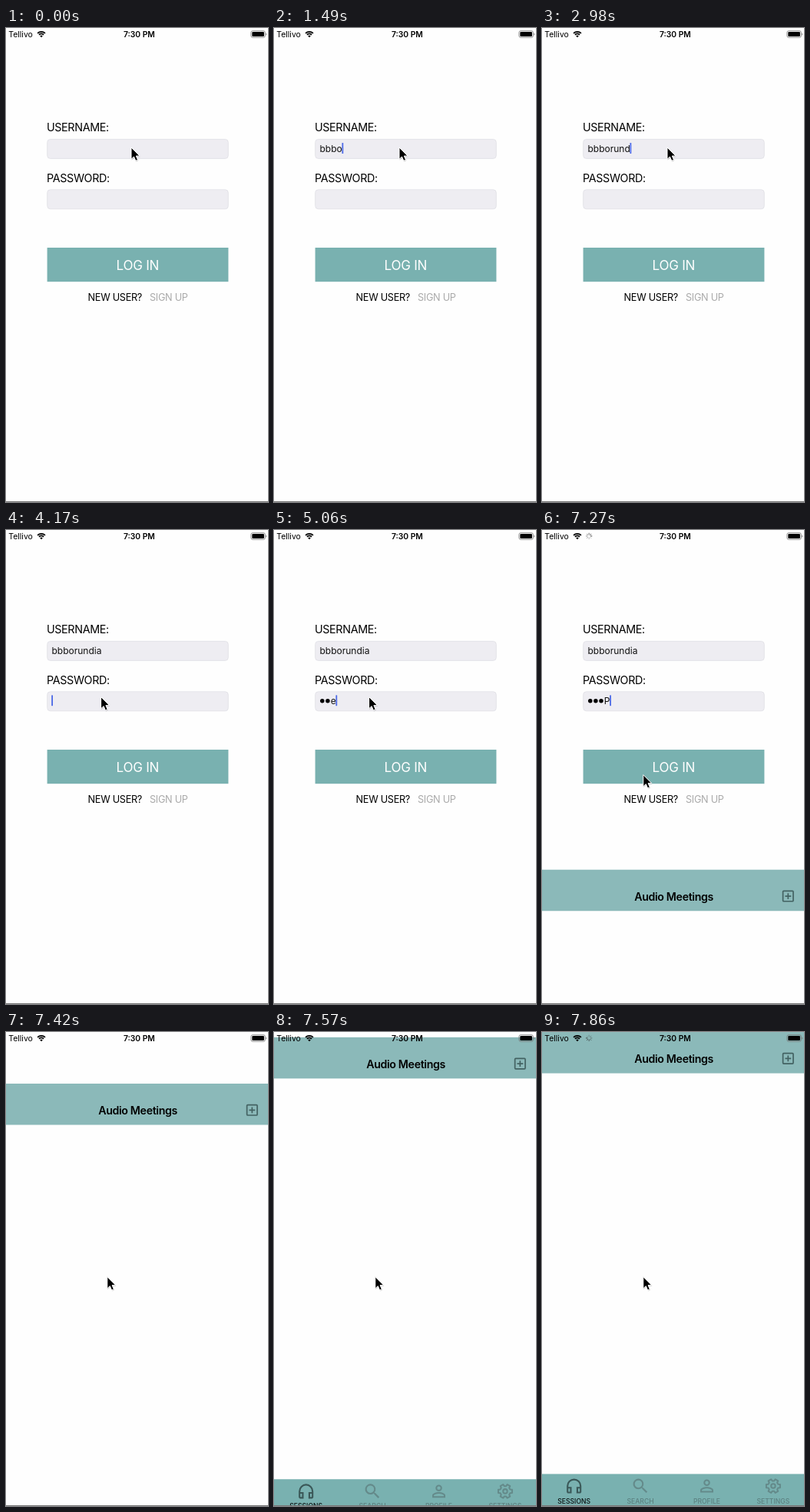
An HTML page for the animation above (8000 ms loop, 341 px wide and 615 px high).

```html
<!DOCTYPE html>
<html lang="en">
<head>
<meta charset="utf-8">
<title>Login screen</title>
<style>
  html, body { margin: 0; width: 100%; height: 100%; overflow: hidden; background: #fefefe; }
  svg { display: block; width: 100vw; height: 100vh; }
  text { font-family: Inter, Roboto, "Liberation Sans", sans-serif; white-space: pre; }
  .label { font-size: 14.3px; letter-spacing: -.35px; }
  .field { fill: #eeedf2; stroke: #dddde3; stroke-width: .7; }
  .entry { font-size: 12px; fill: #111; }
  .small { font-size: 12.7px; letter-spacing: -.3px; }
  .mid { text-anchor: middle; }
  .tab { font-size: 8.6px; font-weight: 500; fill: #5c8181; }
  .icon { fill: #648a8a; fill-rule: evenodd; }
  .active .tab { fill: #0c1414; }
  .active .icon { fill: #3b5858; }
</style>
</head>
<body>
<svg viewBox="0 0 341 615" preserveAspectRatio="none">
  <rect width="341" height="615" fill="#fefefe"/>

  <g id="login">
    <text class="label" x="53" y="134.3">USERNAME:</text>
    <rect class="field" x="53.7" y="144.4" width="235.6" height="25" rx="4"/>
    <text class="entry" id="user" x="59.5" y="160.6"></text>

    <text class="label" x="53" y="199.8">PASSWORD:</text>
    <rect class="field" x="53.7" y="209.8" width="235.6" height="25" rx="4"/>
    <g id="dots"></g>
    <text class="entry" id="letter" y="226.2"></text>
    <rect id="caret" width="1.8" height="14" rx=".6" fill="#4a68e6"/>

    <rect x="53.6" y="285" width="235.8" height="44.2" fill="#79b1b0"/>
    <text class="mid" id="press" x="171.3" y="313.9" font-size="17" letter-spacing="-.25" fill="#fff">LOG IN</text>
    <text class="small" x="106.6" y="354">NEW USER?</text>
    <text class="small" x="187" y="354" fill="#aaa">SIGN UP</text>
  </g>

  <g id="sheet">
    <rect width="341" height="615" fill="#fefefe"/>
    <rect width="341" height="53.5" fill="#8bb9b9"/>
    <text class="mid" x="171.6" y="40" font-size="14.2" font-weight="600" letter-spacing="-.35">Audio Meetings</text>
    <g fill="none" stroke="#436262" stroke-width="1.7">
      <rect x="313.6" y="27.6" width="13.4" height="13.4" rx="1"/>
      <path d="M320.3 30.4v7.8M316.4 34.3h7.8"/>
    </g>
    <rect y="573.4" width="341" height="42" fill="#79b1b0"/>
    <g id="tabs"></g>
  </g>

  <g id="status">
    <text x="3.2" y="12" font-size="10.5">Tellivo</text>
    <g fill="none" stroke="#000" stroke-width="1.8">
      <path d="M41.05 6.85a7 7 0 0 1 9.9 0"/>
      <path d="M42.96 8.76a4.3 4.3 0 0 1 6.08 0"/>
    </g>
    <path d="M46 12.2l-1.8-1.9a2.6 2.6 0 0 1 3.6 0z"/>
    <g id="spinner" stroke="#333" stroke-width=".9" stroke-linecap="round"></g>
    <text class="mid" x="173.4" y="12" font-size="10.3" font-weight="600">7:30 PM</text>
    <rect x="318.9" y="3.7" width="18.4" height="8.6" rx="2.2" fill="none" stroke="#777" stroke-width=".8"/>
    <rect x="320.3" y="5" width="15.6" height="6" rx="1.1"/>
    <path d="M338.4 6.4a1.8 1.8 0 0 1 0 3.2z" fill="#777"/>
  </g>

  <rect y="614" width="341" height="1" fill="#777"/>
  <g id="pointer">
    <path d="M0 0V15.4L3.5 12.2 5.8 17.5 8.7 16.3 6.4 11.2H11.2Z" transform="translate(.5 1)" fill="#000" opacity=".2"/>
    <path d="M0 0V15.2L3.5 12 5.8 17.3 8.5 16.1 6.3 11H11Z" fill="#000" stroke="#fff" stroke-width="1" stroke-linejoin="round"/>
  </g>
</svg>

<script>
const LOOP = 8000;
const NAME = 'bbborundia';
const DOT_STEP = 7.1;
const $ = id => document.getElementById(id);
const set = (el, attrs) => { for (const k in attrs) el.setAttribute(k, attrs[k]); };
function add(parent, tag, attrs, text = '') {
  const el = document.createElementNS('http://www.w3.org/2000/svg', tag);
  set(el, attrs);
  el.textContent = text;
  parent.append(el);
  return el;
}

// Gear outline with six teeth around (12, 12)
function gearPath() {
  const points = [];
  for (let tooth = 0; tooth < 6; tooth++) {
    for (const [turn, r] of [[-20, 6.4], [-13, 8.7], [13, 8.7], [20, 6.4]]) {
      const a = (tooth * 60 + 30 + turn) * Math.PI / 180;
      points.push((12 + r * Math.sin(a)).toFixed(2) + ' ' + (12 - r * Math.cos(a)).toFixed(2));
    }
  }
  return 'M' + points.join('L') + 'Z';
}

const icons = {
  SESSIONS: 'M12 3a9 9 0 0 0-9 9v7c0 1.1.9 2 2 2h4v-8H5v-1a7 7 0 0 1 14 0v1h-4v8h4c1.1 0 2-.9 2-2v-7a9 9 0 0 0-9-9zM7 15v4H5v-4zM19 19h-2v-4h2z',
  SEARCH: 'M15.5 14h-.8l-.3-.3A6.5 6.5 0 1 0 9.5 16c1.6 0 3.1-.6 4.2-1.6l.3.3v.8l5 5 1.5-1.5zM9.5 14a4.5 4.5 0 1 1 0-9 4.5 4.5 0 0 1 0 9z',
  PROFILE: 'M12 4a4 4 0 1 0 0 8 4 4 0 0 0 0-8zM12 5.9a2.1 2.1 0 1 1 0 4.2 2.1 2.1 0 0 1 0-4.2zM12 13c-2.7 0-8 1.3-8 4v3h16v-3c0-2.7-5.3-4-8-4zM12 14.9c3 0 6.1 1.5 6.1 2.1v1.1H5.9V17c0-.6 3.1-2.1 6.1-2.1z',
  SETTINGS: ''
};
Object.entries(icons).forEach(([name, path], i) => {
  const x = 41.7 + 86.4 * i;
  const tab = add($('tabs'), 'g', { class: i ? '' : 'active' });
  const icon = add(tab, 'g', { class: 'icon', transform: `translate(${x - 12.7} 576.3) scale(1.06)` });
  if (path) {
    add(icon, 'path', { d: path });
  } else {
    const line = { style: 'fill:none', stroke: '#648a8a', 'stroke-width': 1.9, 'stroke-linejoin': 'round' };
    add(icon, 'path', { d: gearPath(), ...line });
    add(icon, 'circle', { cx: 12, cy: 12, r: 2.6, ...line });
  }
  add(tab, 'text', { class: 'tab mid', x, y: 611.6 }, name);
});

const dots = [0, 1, 2].map(i =>
  add($('dots'), 'circle', { cx: 62.8 + DOT_STEP * i, cy: 221.8, r: 2.75 }));
const ticks = Array.from({ length: 8 }, (_, i) =>
  add($('spinner'), 'path', { d: 'M0-2.1V-3.7', transform: `translate(61.2 7.9) rotate(${i * 45})` }));

// Each track is a list of [start time, ...values]; values hold until the next start
const tracks = {
  typed: [[0, 0], [1490, 4], [2090, 5], [2530, 6], [2680, 7], [2980, 8], [3130, 9], [3280, 10]],
  secret: [[0, 0, ''], [4620, 0, 's'], [4770, 1, 'a'], [4910, 2, ''], [5060, 2, 'e'], [5660, 3, 'P']],
  caret: [[0, 'user', 0], [590, 'user', 1], [4020, 'user', 0], [4170, 'pass', 1],
    [6250, 'pass', .25], [6400, 'pass', 0], [6690, 'pass', 1]],
  pointer: [[0, 163, 155], [3430, 161, 158], [3570, 150, 173], [3720, 135, 197], [3870, 126, 212],
    [4020, 123.6, 216.6], [5960, 124, 262], [6100, 128, 335], [6250, 129.6, 331.5],
    [6400, 130.3, 324], [6540, 131.6, 318], [6690, 131.8, 317.6]],
  press: [[0, 1], [6840, .3], [7130, 1]],
  spinner: [[0, 0], [6980, 1], [7420, 0], [7710, 1]],
  slide: [[0], [7130], [7270], [7420], [7570], [7710], [7860]]
};
const keyAt = (track, t) => track.findLast(key => key[0] <= t);
const at = (name, t) => keyAt(tracks[name], t).slice(1);

// Critically damped spring, from the bottom edge to the top
function sheetTop(t) {
  const x = Math.max(0, t - 7212.2) * .0182;
  return 615 * (1 + x) * Math.exp(-x);
}

function draw(t) {
  $('user').textContent = NAME.slice(0, at('typed', t)[0]);

  const [hidden, letter] = at('secret', t);
  dots.forEach((dot, i) => set(dot, { opacity: i < hidden ? 1 : 0 }));
  const letterX = 59.5 + DOT_STEP * hidden;
  $('letter').textContent = letter;
  set($('letter'), { x: letterX });

  const [where, alpha] = at('caret', t);
  const inUser = where === 'user';
  const end = inUser
    ? 59.5 + $('user').getComputedTextLength()
    : letterX + $('letter').getComputedTextLength();
  set($('caret'), { x: end - .3, y: inUser ? 149 : 214.2, opacity: alpha });

  const [px, py] = at('pointer', t);
  set($('pointer'), { transform: `translate(${px} ${py})` });
  set($('press'), { opacity: at('press', t)[0] });

  const tick = keyAt(tracks.slide, t)[0];
  set($('sheet'), { transform: `translate(0 ${sheetTop(tick).toFixed(2)})` });
  set($('spinner'), { opacity: at('spinner', t)[0] });
  const head = Math.floor(tick / 125);
  ticks.forEach((el, i) => set(el, { opacity: 1 - .1 * ((head - i + 800) % 8) }));
}

const start = performance.now();
function frame() {
  draw((performance.now() - start) % LOOP);
  requestAnimationFrame(frame);
}
frame();
</script>
</body>
</html>
```
